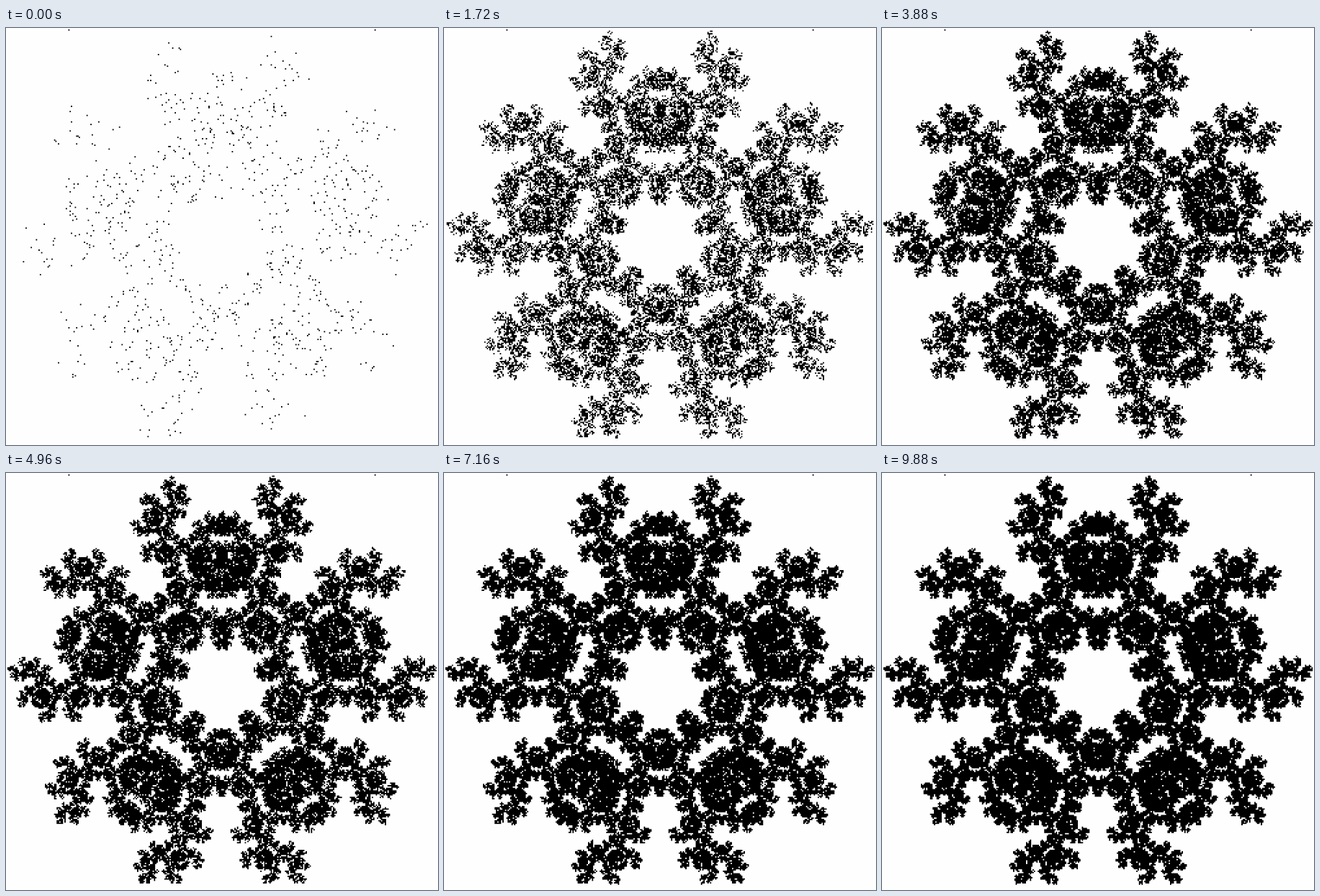
These frames come from a looping animation (600 px wide and 580 px high, 9.92 s). An HTML page with a canvas:

```html
<!DOCTYPE html>
<html lang="en">
<head>
<meta charset="utf-8">
<title>Pentagon chaos game</title>
<style>
  html, body { margin: 0; width: 100%; height: 100%; overflow: hidden; background: #fefefe; }
  canvas { display: block; width: 600px; height: 580px; }
</style>
</head>
<body>
<canvas id="plot" width="666" height="644"></canvas>
<script>
const canvas = document.getElementById('plot');
const ctx = canvas.getContext('2d');
const STEP_MS = 40, STEPS = 248, POINTS_PER_STEP = 1000;
const CENTER_X = 166.5, CENTER_Y = 163.3, RADIUS = 200;

// The plot is a 333 x 322 grid; doubled cells stay crisp and equal in size when scaled by CSS
ctx.scale(2, 2);

// Regular pentagon with one corner pointing down
const corners = Array.from({ length: 5 }, (_, i) => {
  const angle = Math.PI / 2 + i * 2 * Math.PI / 5;
  return { x: CENTER_X + RADIUS * Math.cos(angle), y: CENTER_Y + RADIUS * Math.sin(angle) };
});

let seed, x, y, last, stepsDrawn;

function random() {
  seed = (seed + 0x6D2B79F5) | 0;
  let n = Math.imul(seed ^ (seed >>> 15), 1 | seed);
  n = (n + Math.imul(n ^ (n >>> 7), 61 | n)) ^ n;
  return ((n ^ (n >>> 14)) >>> 0) / 4294967296;
}

function plot(px, py) {
  ctx.fillRect(Math.floor(px), Math.floor(py), 1, 1);
}

// Go halfway to a random corner, never the same corner twice in a row
function jump() {
  last = (last + 1 + Math.floor(random() * 4)) % 5;
  x = (x + corners[last].x) / 2;
  y = (y + corners[last].y) / 2;
}

function reset() {
  seed = 7;
  x = CENTER_X;
  y = CENTER_Y;
  last = 0;
  stepsDrawn = 0;
  ctx.fillStyle = '#fefefe';
  ctx.fillRect(0, 0, canvas.width, canvas.height);
  ctx.fillStyle = '#000';
  corners.forEach(c => plot(c.x, c.y));
  for (let i = 0; i < 20; i++) jump();
}

function draw(time) {
  const target = Math.floor(time / STEP_MS) % STEPS + 1;
  if (target < stepsDrawn) reset();
  for (; stepsDrawn < target; stepsDrawn++) {
    for (let i = 0; i < POINTS_PER_STEP; i++) {
      jump();
      plot(x, y);
    }
  }
}

let start;
function tick(now) {
  start ??= now;
  draw(now - start);
  requestAnimationFrame(tick);
}

reset();
draw(0);
requestAnimationFrame(tick);
</script>
</body>
</html>
```
